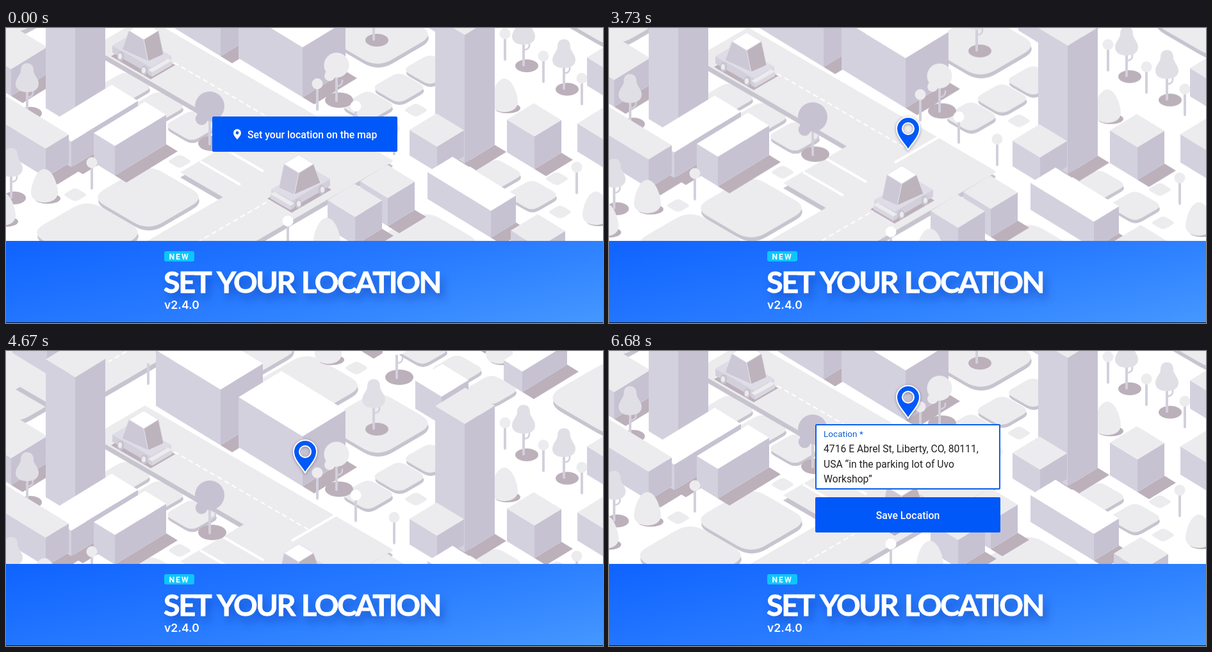
Recreate the animation shown at these times as an HTML page. Size 932 by 460 pixels, loop 8000 ms.

```html
<!DOCTYPE html>
<html lang="en">
<head>
<meta charset="utf-8">
<title>Set your location</title>
<style>
html, body { margin: 0; width: 100%; height: 100%; overflow: hidden; background: #fff; }
.stage { position: relative; width: 932px; height: 460px; overflow: hidden; font-family: Roboto, sans-serif; }
.stage > *, .group > * { position: absolute; }
.stage * { box-sizing: border-box; }
svg { display: block; left: 0; top: 0; overflow: visible; }

.map, .pin, .group, .start, .save, .field, .lines, .ghost { animation: 8s linear infinite both; }
.map { animation-name: pan; }
.group { left: 0; top: 0; animation-name: lift; }
.pin { left: 467px; animation-name: drop; filter: drop-shadow(0 1px 2px rgba(70, 60, 90, .5)); }

.button { left: 322px; width: 289px; height: 55px; border-radius: 2px; background: #0058f8;
  color: #fff; font-size: 15.8px; font-weight: 500; line-height: 58px; text-align: center; white-space: pre; }
.start { top: 138px; padding-left: 55px; text-align: left; animation-name: leave; }
.start svg { position: absolute; left: 39px; top: 36px; }
.save { top: 228px; animation-name: enter; }

.field { left: 322px; top: 199px; width: 289px; border: 2px solid #0b5fef; border-radius: 2px;
  background: #fff; overflow: hidden; font-size: 15.7px; line-height: 23.6px; color: #222; white-space: pre; animation-name: grow; }
.field div { position: absolute; left: 11px; }
.label { top: 3px; font-size: 13.6px; line-height: 20px; color: #0b5fd8; }
.lines { width: 264px; animation-name: wrap; }
.ghost { width: 217px; overflow: hidden; animation-name: ghost; }

.banner { left: 0; top: 332px; width: 932px; height: 127px;
  background: linear-gradient(168deg, #0f63ff, #2a7dff 55%, #4597ff); }
.rule { left: 0; top: 459px; width: 932px; height: 1px; background: #061226; }
.heading { fill: #fff; }
.title { font: 700 46.7px Lato, sans-serif; letter-spacing: -2.4px; stroke: #fff; stroke-width: .9px;
  filter: drop-shadow(5px 9px 7px rgba(0, 40, 150, .42)); }
.badge { font: 700 12.3px Roboto, sans-serif; letter-spacing: 1.9px; }
.version { font: 600 17.6px Inter, sans-serif; }

@keyframes pan {
  0%, 43.75% { transform: translateY(0); animation-timing-function: cubic-bezier(.37, 0, .63, 1); }
  56.25% { transform: translateY(135px); animation-timing-function: cubic-bezier(.37, 0, .63, 1); }
  62.81%, 100% { transform: translateY(0); }
}
@keyframes drop {
  0%, 37.49% { transform: translateY(-20px); }
  37.5% { transform: translateY(12px); animation-timing-function: cubic-bezier(.3, .5, .4, 1); }
  43.5%, 100% { transform: translateY(190px); }
}
@keyframes lift {
  0%, 71.875% { transform: translateY(0); animation-timing-function: cubic-bezier(.37, 0, .63, 1); }
  80.25%, 100% { transform: translateY(-85px); }
}
@keyframes leave { 0%, 27% { opacity: 1; } 30%, 100% { opacity: 0; } }
@keyframes enter { 0%, 79.6% { opacity: 0; } 83.4%, 100% { opacity: 1; } }
@keyframes grow {
  0%, 69.6% { opacity: 0; height: 57px; }
  71.875% { opacity: 1; height: 57px; }
  75.125% { height: 94px; }
  77.5%, 100% { opacity: 1; height: 102px; }
}
@keyframes wrap {
  0%, 72.5% { opacity: 0; top: 21px; clip-path: inset(0 47px 0 0); }
  75.125% { opacity: 1; top: 21px; clip-path: inset(0 47px 0 0); }
  78.5%, 100% { opacity: 1; top: 24.5px; clip-path: inset(0); }
}
@keyframes ghost {
  0%, 71.875% { opacity: 1; top: 24px; }
  75.125% { opacity: .36; top: 43px; }
  76.5%, 100% { opacity: 0; top: 48px; }
}
</style>
</head>
<body>
<div class="stage">
  <svg class="map" id="map" width="932" height="460"></svg>
  <div class="button start"><svg width="1" height="1"><path fill="#fff" fill-rule="evenodd" d="M0 0C-2-3-6-6-6-10.500A6 6 0 1 1 6-10.500C6-6 2-3 0 0ZM-2.400-10.500a2.400 2.400 0 1 0 4.800 0a2.400 2.400 0 1 0-4.800 0Z"/></svg>Set your location on the map</div>
  <div class="group">
    <svg class="pin" width="1" height="1"><path fill="#0058f8" fill-rule="evenodd" stroke="#fff" stroke-width="2" stroke-linejoin="round" d="M0 0C-5-9-18-20-18-33A18 18 0 1 1 18-33C18-20 5-9 0 0ZM-9-33a9 9 0 1 0 18 0a9 9 0 1 0-18 0Z"/></svg>
    <div class="field">
      <div class="label">Location *</div>
      <div class="ghost">4716 E Abrel St, Liberty, CO, 80111,</div>
      <div class="lines">4716 E Abrel St, Liberty, CO, 80111,
USA “in the parking lot of Uvo
Workshop”</div>
    </div>
  </div>
  <div class="button save">Save Location</div>
  <div class="banner"></div>
  <svg class="heading" width="932" height="460">
    <rect x="247" y="348" width="47" height="16" rx="3" fill="#0cc6fb"/>
    <text class="badge" x="254.500" y="360.500">NEW</text>
    <g class="title"><text x="246" y="412.500">SET</text><text x="329" y="412.500">YOUR</text><text x="461" y="412.500">LOCATION</text></g>
    <text class="version" x="247" y="438">v2.4.0</text>
  </svg>
  <div class="rule"></div>
</div>
<script>
const GROUND = 0.58, ROOF = 0.61; // isometric slopes
const WHITE = '#fff', PALE = '#ececee', LEFT = '#d4d1df', RIGHT = '#c7c2d2',
  EDGE = '#c8c4cf', SHADE = '#bcb0bb', STEM = '#d3d0dc', LEAF = '#e1dfe6', GLASS = ['#ccc8d5', '#bdb3bd'];
const layers = { kerb: '', road: '', pads: '', shade: '' };
const items = [];
const add = (depth, art) => items.push({ depth, art });

const poly = (pts, fill) => `<polygon points="${pts}" fill="${fill}"/>`;
const oval = (x, y, rx, ry, fill) => `<ellipse cx="${x}" cy="${y}" rx="${rx}" ry="${ry}" fill="${fill}"/>`;
const path = (d, fill, extra = '') => `<path d="${d}" fill="${fill}" ${extra}/>`;
const shift = (quad, dx, dy) => quad.map(([x, y]) => [x + dx, y + dy]);

// Corners left, front, right, back of a flat iso rectangle, from its front corner
const rect = (x, y, a, b, k = ROOF) =>
  [[x - a, y - a * k], [x, y], [x + b, y - b * k], [x + b - a, y - (a + b) * k]];

const prism = (top, base, left, right, roof) =>
  poly([top[0], top[1], base[1], base[0]], left) +
  poly([top[1], top[2], base[2], base[1]], right) + poly(top, roof);

// Repeats a part along an iso axis, towards the viewer
function row(n, x, y, dx, draw) {
  for (let i = 0; i < n; i++) draw(x + i * dx, y + i * Math.abs(dx) * GROUND);
}

function pad(x, y, w, kerb = 0) {
  const r = w * 1.14; // rounding the corners takes this back
  const pts = rect(x, y + r * GROUND, r, r, GROUND);
  const mix = (p, q) => p.map((v, i) => v + (q[i] - v) / 4);
  const d = pts.map((p, i) =>
    `${i ? 'L' : 'M'}${mix(p, pts[(i + 3) % 4])}Q${p} ${mix(p, pts[(i + 1) % 4])}`).join('') + 'Z';
  if (kerb) layers.pads += path(d, EDGE, `transform="translate(1 ${kerb})"`);
  layers.pads += path(d, PALE);
}

function road(x, y, a, b) {
  const quad = rect(x + b - a, y + (a + b) * GROUND, b, a, GROUND)
    .map(([px, py]) => [px, py]);
  layers.kerb += poly(shift(quad, 0, 8), EDGE);
  layers.road += poly(quad, PALE);
}

function stripe(x, y, dx, slope, width, dash = '') {
  layers.road += path(`M${x} ${y}l${dx} ${dx * slope}`, 'none',
    `stroke="#fff" stroke-width="${width}" stroke-dasharray="${dash}"`);
}

function block(x, y, a, b, h, roof = PALE) {
  const top = rect(x, y, a, b), base = shift(top, 0, h);
  layers.shade += poly([base[1], base[2], ...shift([base[2], base[1]], 18, 11)], SHADE);
  add(y + h, prism(top, base, LEFT, RIGHT, roof));
}
const cube = (x, y, h = 44) => block(x, y, 43, 42, h);

const stem = (x, y1, y2) => path(`M${x} ${y1}V${y2}`, 'none', `stroke="${STEM}" stroke-width="4" stroke-linecap="round"`);
const twig = (x, y) => path(`M${x} ${y}q10 0 9-10`, 'none', `stroke="${STEM}" stroke-width="2.500"`);

function lamp(x, y, fill = PALE) {
  add(y + 41, stem(x, y, y + 40) + oval(x, y, 8.5, 8.5, fill));
}

function poplar(x, y) {
  layers.shade += oval(x + 5, y + 78, 18, 10, SHADE);
  add(y + 78, stem(x, y + 40, y + 77) + twig(x, y + 53) +
    path(`M${x} ${y}c8 0 10 6 10 12c0 6 8 12 8 20c0 9-8 13-18 13s-18-4-18-13c0-8 8-14 8-20c0-6 2-12 10-12Z`, LEAF));
}

function tree(x, y, r, fill) {
  const base = y + 36 + r;
  layers.shade += oval(x + 4, base - 1, 22, 12, SHADE);
  add(base + 1, stem(x, y, base) + twig(x, y + r + 13) +
    oval(x, y, r, r, fill) + oval(x - r * 0.55, y + r * 0.85, r * 0.42, r * 0.42, fill));
}

function bush(x, y) {
  layers.shade += oval(x + 5, y + 20, 20, 8, SHADE);
  add(y + 26, path(`M${x} ${y - 26}c14 0 21 28 21 36c0 11-10 16-21 16s-21-5-21-16c0-8 7-36 21-36Z`, PALE));
}

// flip is 1 or -1, the light stays on the same side
function car(x, y, flip) {
  const glass = flip > 0 ? GLASS : [...GLASS].reverse();
  const box = (quad, h, roof) => prism(quad, shift(quad, 0, h), STEM, '#dad7e1', roof);
  const wheel = (wx, wy) => oval(wx, wy, 5.5, 7.5, EDGE) + oval(wx - 1, wy, 3, 4.5, PALE);
  add(y + 76, `<g transform="translate(${x} ${y}) scale(${flip} 1)">` +
    poly(rect(15, 80, 62, 38, GROUND), SHADE) +
    box(rect(15, 62, 60, 32, GROUND), 11, '#dedce6') +
    box(rect(17, 69, 6, 31, GROUND), 7, PALE) +
    wheel(-32, 44) + wheel(5, 66) +
    `<g stroke="#e4e2ea">${prism(rect(4, 18, 23, 23), rect(11, 52, 41, 24, 0.45), ...glass, WHITE)}</g></g>`);
}

// Streets and parking
road(265, -196, 250, 80);
road(217, -18, 83, 387);
road(519, 159, 330, 85);
road(372, 167, 100, 90);
stripe(240, 41, 236, GROUND, 2, '8 5');
stripe(418, 265, -118, -GROUND, 2, '8 5');
stripe(222, -122, -62, -GROUND, 2, '8 5');
row(2, 339, 187, -36, (x, y) => stripe(x, y, 63, GROUND, 4));
stripe(446, 193, 68, -GROUND, 4);

// Lawns
const large = (x, y) => pad(x, y, 79, 6), small = (x, y) => pad(x, y, 38, 5), tile = (x, y) => pad(x, y, 17);
row(2, 370, -107, 100, large);
row(2, 222, 264, -95, large);
row(2, 10, -50, 940, (x) => pad(x, x < 99 ? -50 : -30, 97, 7));
large(580, 10);
large(655, 336);
row(3, 650, -105, 54, small);
row(3, 186, 92, 52, small);
row(3, 662, 65, -48.5, small);
row(2, 765, 228, 56, small);
row(2, 465, -124, 82, tile);
row(2, 271, 208, -163, (x, y) => tile(x, Math.min(y, 260)));
tile(640, 128);
tile(860, 235);
tile(865, 287);

// Upper town
block(64, -112, 54, 50, 45);
block(8, 64, 60, 56, 42);
block(556, -150, 29, 30, 48);
block(730, -140, 33, 40, 30);
block(806, -71, 29, 70, 32, WHITE);
block(680, -32, 41, 42, 44, WHITE);
block(335, -43, 101, 66, 87, WHITE);
block(463, 30, 100, 67, 78, WHITE);
row(2, 108, -62, 608, (x, y) => block(x, Math.min(y, 11), 46, 47, x < 200 ? 215 : 200));

// Lower town
block(102, 177, 41, 104, 40, WHITE);
block(170, 184, 33, 80, 46, WHITE);
block(62, 188, 110, 36, 45);
block(757, 285, 99, 39, 42, WHITE);
row(2, 596, 265, -51, cube);
cube(673, 185, 40);
cube(825, 169, 51);
cube(935, 175);
cube(950, 72);
cube(831, 342);

// Street furniture and plants
row(3, 486, 87, 60, (x, y) => lamp(x, y, x === 546 ? WHITE : PALE));
row(3, 779, 9, 60, lamp);
lamp(222, -92);
lamp(134, 210);
lamp(891, 217);
lamp(440, 301, WHITE);
row(2, 808, -19, 63, poplar);
poplar(574, -59);
poplar(33, 55);
poplar(8, 187);
tree(318, 122, 23, RIGHT);
tree(516, 58, 19.5, PALE);
tree(610, -120, 23, WHITE);
row(2, 503, -109, 267, (x) => bush(x, -109));
bush(60, 246);
bush(778, 105);
bush(921, 281);
bush(-6, 282);
bush(501, 322);
car(211, 0, 1);
car(461, 208, -1);

items.sort((p, q) => p.depth - q.depth);
document.getElementById('map').innerHTML =
  layers.pads + layers.kerb + layers.road + layers.shade + items.map(i => i.art).join('');
</script>
</body>
</html>
```
